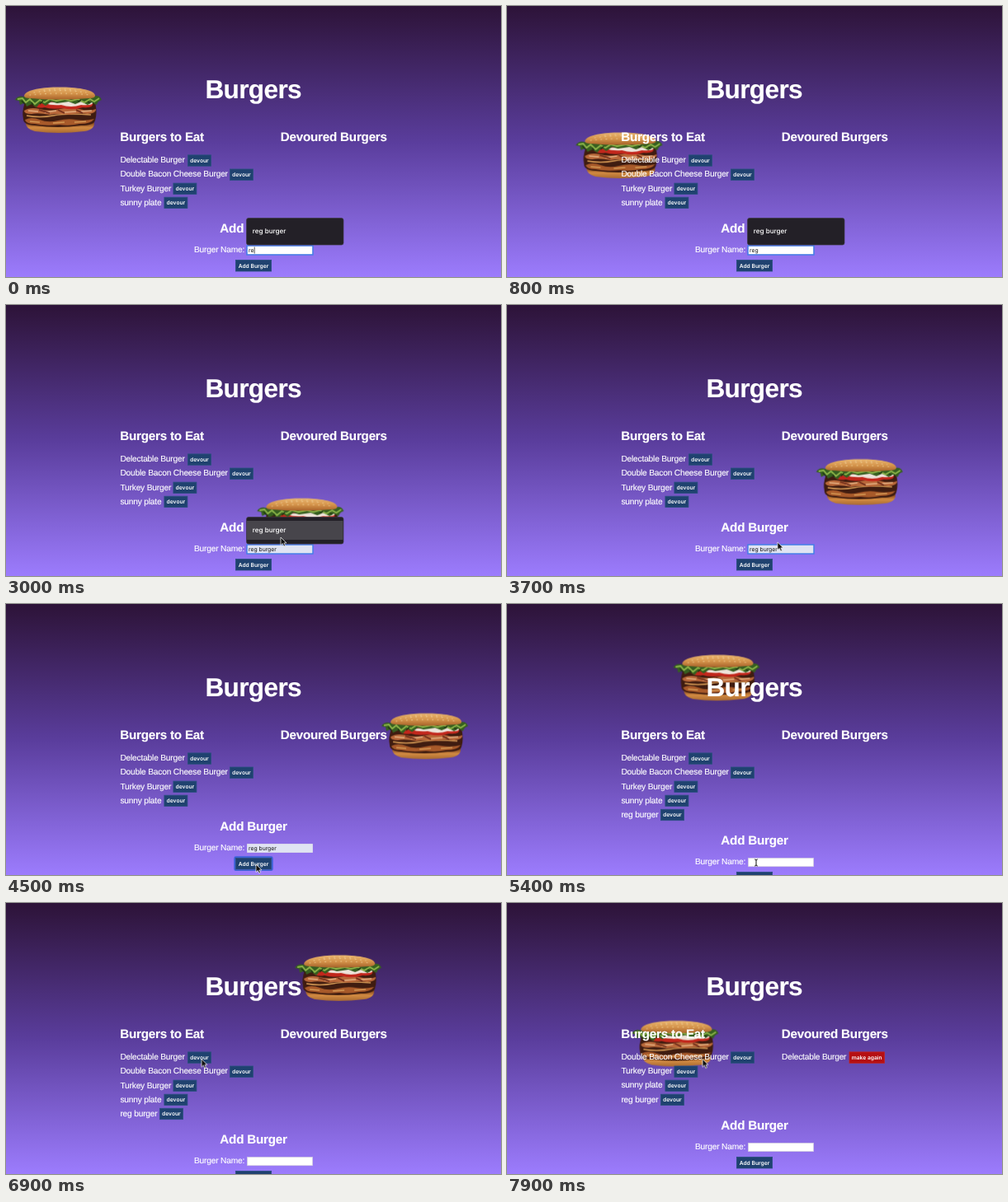
Animation of 600x329 px, one loop 8000 ms. Source, as an HTML page:

```html
<!DOCTYPE html>
<html lang="en">
<head>
<meta charset="utf-8">
<title>Burgers</title>
<style>
html, body { margin: 0; width: 100%; height: 100%; overflow: hidden; }
body { background: linear-gradient(#2d1338, #5a3d9c 50%, #9c7cfd) 0 0 / 600px 329px no-repeat; }
svg { display: block; text-rendering: geometricPrecision; }
text {
  fill: #fff; stroke: #fff; stroke-width: .15;
  font: 10.2px "Liberation Sans", Arial, sans-serif; letter-spacing: -.19px;
}
.title { font-size: 31.6px; font-weight: 700; letter-spacing: -.65px; text-anchor: middle; }
.head { font-size: 15.2px; font-weight: 700; letter-spacing: -.22px; }
.mid { text-anchor: middle; }
.btn text, .option, .typed { stroke: none; letter-spacing: 0; }
.btn text { font: 600 6.7px Inter, sans-serif; text-anchor: middle; }
.btn rect { fill: #1f426f; stroke: #2a4f80; stroke-width: .8; }
.btn.red rect { fill: #b50f12; stroke: #c42222; }
.typed { fill: #111; font: 6.8px Inter, sans-serif; }
.option { font: 500 8.1px Inter, sans-serif; }

/* Hard switches over the 8 s loop */
.step { animation: 8s step-end infinite; }
.first { animation-name: first; }
.rest { animation-name: rest; }
.form { animation-name: form; }
.added { animation-name: added; }
.eaten { animation-name: eaten; }
.re { animation-name: re; }
.reg { animation-name: reg; }
.caret { animation-name: caret; }
.filled { animation-name: filled; }
.focus { animation-name: focus; }
.popup { animation-name: popup; }
.hover { animation-name: hover; }
.pressed { animation-name: pressed; }
.arrow { animation-name: arrow; }
.beam { animation-name: beam; }
@keyframes first { 0% { visibility: visible } 93.125%, 100% { visibility: hidden } }
@keyframes rest { 0% { transform: none } 93.125%, 100% { transform: translateY(-17.1px) } }
@keyframes form { 0%, 93.125%, 100% { transform: none } 56.875% { transform: translateY(17.1px) } }
@keyframes added { 0% { visibility: hidden } 56.875%, 100% { visibility: visible } }
@keyframes eaten { 0% { visibility: hidden } 93.125%, 100% { visibility: visible } }
@keyframes re { 0% { visibility: visible } 1.25%, 100% { visibility: hidden } }
@keyframes reg { 0%, 35%, 100% { visibility: hidden } 1.25% { visibility: visible } }
@keyframes caret {
  0%, 7.5%, 20%, 32.5%, 100% { visibility: hidden }
  1.25%, 13.75%, 26.25% { visibility: visible }
}
@keyframes filled { 0%, 56.875%, 100% { visibility: hidden } 35% { visibility: visible } }
@keyframes focus { 0% { visibility: visible } 53.5%, 100% { visibility: hidden } }
@keyframes popup { 0% { visibility: visible } 42.5%, 100% { visibility: hidden } }
@keyframes hover { 0%, 42.5%, 100% { visibility: hidden } 35% { visibility: visible } }
@keyframes pressed { 0%, 56.875%, 100% { visibility: hidden } 53.5% { visibility: visible } }
@keyframes arrow { 0%, 56.875% { visibility: hidden } 30%, 70.6%, 100% { visibility: visible } }
@keyframes beam { 0%, 70.6%, 100% { visibility: hidden } 56.875% { visibility: visible } }

/* Straight flight, bouncing off the edges; restarts with each page load */
.burger { animation: fly 8s linear infinite; }
@keyframes fly {
  0% { transform: translate(11px, 97px) }
  .5% { transform: translate(7px, 100px) }
  31.125% { transform: translate(253px, 268px) }
  56.874% { transform: translate(460px, 128px) }
  56.875% { transform: translate(117px, 59.5px) }
  93.124% { transform: translate(404.6px, 62.4px) }
  93.125%, 94.749% { transform: translate(-200px, 60px) }
  94.75% { transform: translate(120px, 59px) }
  100% { transform: translate(161px, 167px) }
}
.pointer { animation: point 8s ease-in-out infinite; }
@keyframes point {
  0%, 30% { transform: translate(350px, 318px) }
  36.25%, 43.75% { transform: translate(333px, 282px) }
  52.5%, 70% { transform: translate(303px, 316px) }
  83.75%, 100% { transform: translate(237px, 189.5px) }
}
</style>
</head>
<body>
<svg width="600" height="329" viewBox="0 0 600 329">
  <defs>
    <linearGradient id="bun" x2="0" y2="1">
      <stop stop-color="#e9b56f"/><stop offset=".5" stop-color="#d6954c"/><stop offset="1" stop-color="#a8622a"/>
    </linearGradient>
    <linearGradient id="base" x2="0" y2="1">
      <stop stop-color="#7a3c18"/><stop offset=".5" stop-color="#d28b42"/><stop offset="1" stop-color="#a96a30"/>
    </linearGradient>
    <g id="devour" class="btn">
      <rect x=".4" y="180.9" width="28" height="13.4"/>
      <text x="14.4" y="190">devour</text>
    </g>
  </defs>

  <g class="burger">
    <path d="M13 45Q52 51 96 44Q97 53 84 55Q52 59 24 55Q13 52 13 45Z" fill="url(#base)"/>
    <path d="M12 20H97Q100 32 97 42Q95 48 80 48Q52 52 24 48Q10 47 10 40Q8 31 12 20Z" fill="#3f1c10"/>
    <path d="M12 41Q20 37 30 41T52 42T74 41T96 40Q92 46 78 46Q66 49 54 47Q36 49 24 46Q13 46 12 41Z" fill="#a85a2a"/>
    <path d="M18 43L30 44M46 45L60 44M72 44L86 43M14 36Q30 39 46 36T92 35" fill="none" stroke="#d69a55" stroke-width="1.3"/>
    <path d="M11 30Q18 25 30 28T54 28T78 28T98 28Q99 33 88 34Q76 32 66 35Q52 33 42 35Q28 32 20 34Q11 34 11 30Z" fill="#b9683a"/>
    <path d="M16 30L28 31M36 32L50 30M60 32L74 31M80 31L93 30" fill="none" stroke="#e5b183" stroke-width="1.5"/>
    <path d="M29 29L42 33M52 29L60 33M74 29L82 33" fill="none" stroke="#6d2b1a" stroke-width="1.5"/>
    <path d="M22 22Q52 16 94 21Q96 27 82 26Q70 30 58 27Q44 29 36 26Q24 28 22 22Z" fill="#c2271c"/>
    <path d="M36 21Q56 17 94 20Q95 24 80 23Q68 27 56 23Q44 24 36 21Z" fill="#eee3da"/>
    <path d="M0 17Q3 11 11 13Q52 9 96 12Q103 11 105 17Q100 18 99 23L93 20L88 23L80 19L73 22L65 19L58 20L51 21L44 19L37 24L31 20L26 26L20 22L14 25L12 20L6 23L5 18Z" fill="#365f20"/>
    <path d="M3 16L9 15L13 20L18 16L24 22L30 17L36 20L42 16L50 18L60 16L68 18L76 16L84 20L91 16L96 19L102 15" fill="none" stroke="#8fb84a" stroke-width="1.8"/>
    <path d="M8 18L12 22M20 20L22 23M30 22L34 18M76 19L80 17M88 19L91 21" fill="none" stroke="#1d3512" stroke-width="1.5"/>
    <path d="M11 12C13 4 34 1.5 54 1.5S95 4 97 11Q98 15 89 15Q52 18 19 15Q11 15 11 12Z" fill="url(#bun)"/>
    <path d="M23 8Q52 3 86 8M18 11Q53 7 92 11M35 5Q54 2.5 73 5" fill="none" stroke="#f3d6a0" stroke-width=".9" stroke-linecap="round" stroke-dasharray=".8 5.5"/>
  </g>

  <text class="title" x="299.7" y="112">Burgers</text>
  <text class="head" x="138.3" y="164.4">Burgers to Eat</text>
  <text class="head" x="332.8" y="164.4">Devoured Burgers</text>

  <g class="step first">
    <text x="138.4" y="190.3">Delectable Burger</text>
    <use href="#devour" x="220"/>
  </g>
  <g class="step rest">
    <text x="138.4" y="207.4">Double Bacon Cheese Burger</text>
    <use href="#devour" x="271" y="17.1"/>
    <text x="138.4" y="224.5">Turkey Burger</text>
    <use href="#devour" x="202.5" y="34.2"/>
    <text x="138.4" y="241.6">sunny plate</text>
    <use href="#devour" x="191.5" y="51.3"/>
    <g class="step added">
      <text x="138.4" y="258.7">reg burger</text>
      <use href="#devour" x="186" y="68.4"/>
    </g>
  </g>
  <g class="step eaten">
    <text x="333" y="190.3">Delectable Burger</text>
    <g class="btn red">
      <rect x="415" y="180.9" width="42.5" height="13.4"/>
      <text x="436.2" y="190">make again</text>
    </g>
  </g>

  <g class="step form">
    <text class="head mid" x="300" y="274.6">Add Burger</text>
    <text x="228" y="299.2">Burger Name:</text>
    <rect x="292.3" y="291.3" width="79.4" height="10.4" fill="#fff" stroke="#c9c4d8" stroke-width=".6"/>
    <rect class="step filled" x="292.5" y="291.5" width="79" height="10" fill="#e0e4f3"/>
    <rect class="step focus" x="292" y="291" width="80" height="11" fill="none" stroke="#3f7fe8" stroke-width="1.4"/>
    <g class="step re">
      <text class="typed" x="294" y="299">re</text>
      <path d="M301.2 292.5v8" stroke="#111" stroke-width=".7"/>
    </g>
    <text class="typed step reg" x="294" y="299">reg</text>
    <path class="step caret" d="M305.6 292.5v8" stroke="#111" stroke-width=".7"/>
    <text class="typed step filled" x="294" y="299">reg burger</text>
    <rect class="step pressed" x="277.2" y="307.2" width="45.6" height="16" rx="1.5" fill="none" stroke="#3a62d6" stroke-width="1.8"/>
    <g class="btn">
      <rect x="278.4" y="308.4" width="43.2" height="13.6"/>
      <text x="300" y="317.7">Add Burger</text>
    </g>
  </g>

  <g class="step popup">
    <rect x="291.5" y="257.5" width="117.5" height="32.5" rx="2.5" fill="#232027" stroke="#3d3843" stroke-width=".7"/>
    <rect class="step hover" x="292" y="262" width="116.5" height="23" fill="#47454b"/>
    <text class="option" x="298.8" y="276.3">reg burger</text>
  </g>

  <g class="pointer">
    <path class="step arrow" d="M0 0V9.6L2.3 7.5L3.8 11L5.5 10.2L4 6.9H7Z" fill="#111" stroke="#fff" stroke-width=".7"/>
    <path class="step beam" d="M-2.8 -6Q-1 -6 -1 -4.8Q-1 -6 .8 -6M-1 -5V1M-2.8 2Q-1 2 -1 .8Q-1 2 .8 2" fill="none" stroke="#111" stroke-width="1"/>
  </g>
</svg>
</body>
</html>
```
